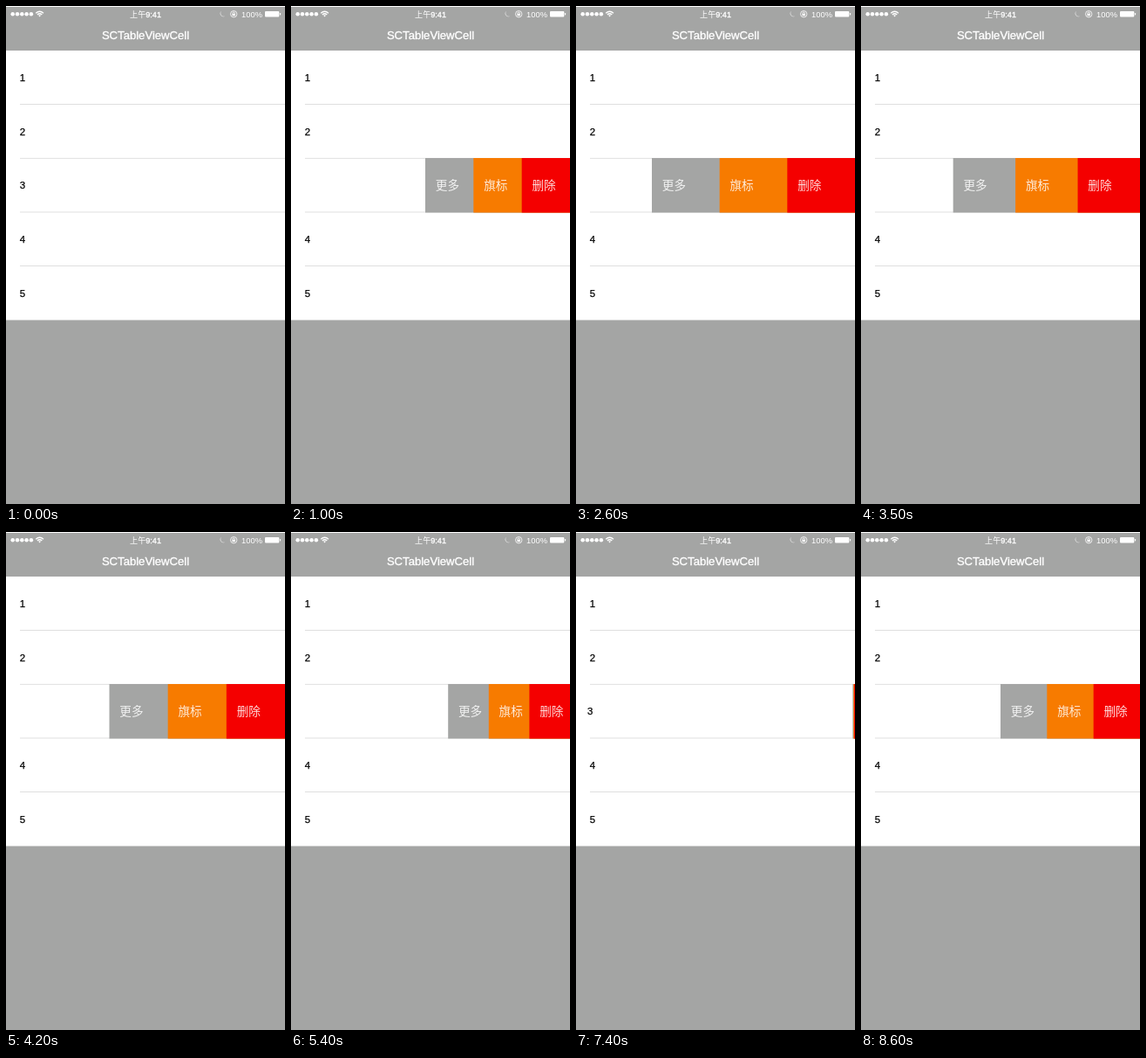
An HTML page for the animation above (8700 ms loop, 320x570 px).

```html
<!DOCTYPE html>
<html lang="zh-CN">
<head>
<meta charset="utf-8">
<title>SCTableViewCell</title>
<style>
  html, body { margin: 0; width: 100%; height: 100%; overflow: hidden; background: #a4a5a4; }
  svg { display: block; width: 320px; height: 570px; }
  text { font-family: "Liberation Sans", "Noto Sans CJK SC", "Noto Sans CJK", sans-serif; }
  .bar text { fill: #fff; }
  .medium { stroke: #fff; stroke-width: .35px; }
  .label { font-size: 11.5px; fill: #000; stroke: #000; stroke-width: .25px; }
  .action text { font: 300 13.6px "Noto Sans CJK SC", "Noto Sans CJK", sans-serif; fill: #fff; fill-opacity: .85; }
</style>
</head>
<body>
<svg viewBox="0 0 320 570">
  <rect width="320" height="570" fill="#a4a5a4"/>
  <rect width="320" height="1" fill="#fff"/>
  <rect y="51" width="320" height="308.5" fill="#fff"/>
  <g class="bar">
    <g id="signal" fill="#fff"></g>
    <g fill="none" stroke="#fff" stroke-width="1.3">
      <path d="M34.2 8.2Q38.6 4.4 43 8.2M35.9 10Q38.6 7.6 41.3 10"/>
      <path d="M37.2 10.8L38.6 12.4L40 10.8Q38.6 9.8 37.2 10.8Z" fill="#fff" stroke="none"/>
    </g>
    <text x="160" y="12.6" font-size="9.1" text-anchor="middle">上午<tspan class="medium">9:41</tspan></text>
    <path d="M247 6A3.5 3.5 0 0 0 251.2 11.4A3.3 3.3 0 1 1 247 6Z" fill="#fff" opacity=".65"/>
    <g fill="none" stroke="#fff" stroke-width=".8">
      <circle cx="261.2" cy="9.2" r="3.7"/>
      <path d="M260 9V8.2A1.2 1.2 0 0 1 262.4 8.2V9"/>
      <rect x="259.5" y="8.8" width="3.4" height="2.4" fill="#fff" stroke="none"/>
    </g>
    <text x="270" y="12.6" font-size="9.4">100%</text>
    <rect x="297" y="6" width="16.3" height="6.4" rx="1" fill="#fff"/>
    <rect x="313.9" y="8" width="1.2" height="2.4" rx=".6" fill="#fff"/>
    <text class="medium" x="160" y="38.3" font-size="13.1" text-anchor="middle">SCTableViewCell</text>
  </g>
  <g id="table"></g>
  <g id="actions"></g>
</svg>
<script>
const LOOP = 8700, STEP = 100, TOP = 51, ROW = 61.7, OPEN = 160;
const ACTIONS = [["更多", "#a4a5a4"], ["旗标", "#f77b00"], ["删除", "#f40000"]];

// Each move carries a row from where it is to a new swipe distance
const move = (row, start, end, to) => ({ row, start, end, to });
const MOVES = [
  move(3, 400, 1000, 166),
  move(3, 1000, 1400, OPEN),
  move(3, 1700, 2600, 233),
  move(3, 2600, 4200, 201.5),
  move(3, 4200, 5000, OPEN),
  move(3, 5200, 6100, 0),
  move(2, 6000, 6600, 209),
  move(2, 6600, 7000, OPEN),
  move(2, 7000, 7400, 0),
  move(3, 7300, 8600, OPEN)
];

const byId = id => document.getElementById(id);
const clamp = p => Math.min(1, Math.max(0, p));
const ease = p => p * p * (3 - 2 * p);

function make(tag, attrs, parent, text) {
  const el = document.createElementNS("http://www.w3.org/2000/svg", tag);
  for (const key in attrs) el.setAttribute(key, attrs[key]);
  if (text) el.textContent = text;
  return parent.appendChild(el);
}

function makeRow(n) {
  const y = TOP + (n - 1) * ROW;
  const label = make("text", { class: "label", x: 15.7, y: y + 35 }, byId("table"), String(n));
  make("rect", { x: 16, y: y + ROW - .5, width: 304, height: .7, fill: "#d2d2d2" }, byId("table"));
  const buttons = ACTIONS.map(([name, fill]) => {
    const g = make("g", { class: "action" }, byId("actions"));
    make("rect", { y: Math.floor(y), width: 320, height: 62.5, fill }, g);
    make("text", { x: 11.8, y: y + 36 }, g, name);
    return g;
  });
  return { n, label, buttons };
}

function swipe(row, t) {
  return MOVES.filter(m => m.row === row).reduce(
    (x, m) => x + (m.to - x) * ease(clamp((t - m.start) / (m.end - m.start))), 0);
}

for (let i = 0; i < 5; i++) make("circle", { cx: 7.7 + 5.3 * i, cy: 9.2, r: 2.25 }, byId("signal"));
const rows = [1, 2, 3, 4, 5].map(makeRow);

function draw(now) {
  const t = Math.floor(now % LOOP / STEP) * STEP;
  for (const { n, label, buttons } of rows) {
    const open = swipe(n, t);
    label.setAttribute("transform", `translate(${-open} 0)`);
    buttons.forEach((b, i) => {
      b.setAttribute("transform", `translate(${320 - open * (3 - i) / 3} 0)`);
      b.style.display = open > 0 ? "" : "none";
    });
  }
}

const start = performance.now();
function tick() {
  draw(performance.now() - start);
  requestAnimationFrame(tick);
}
tick();
</script>
</body>
</html>
```
